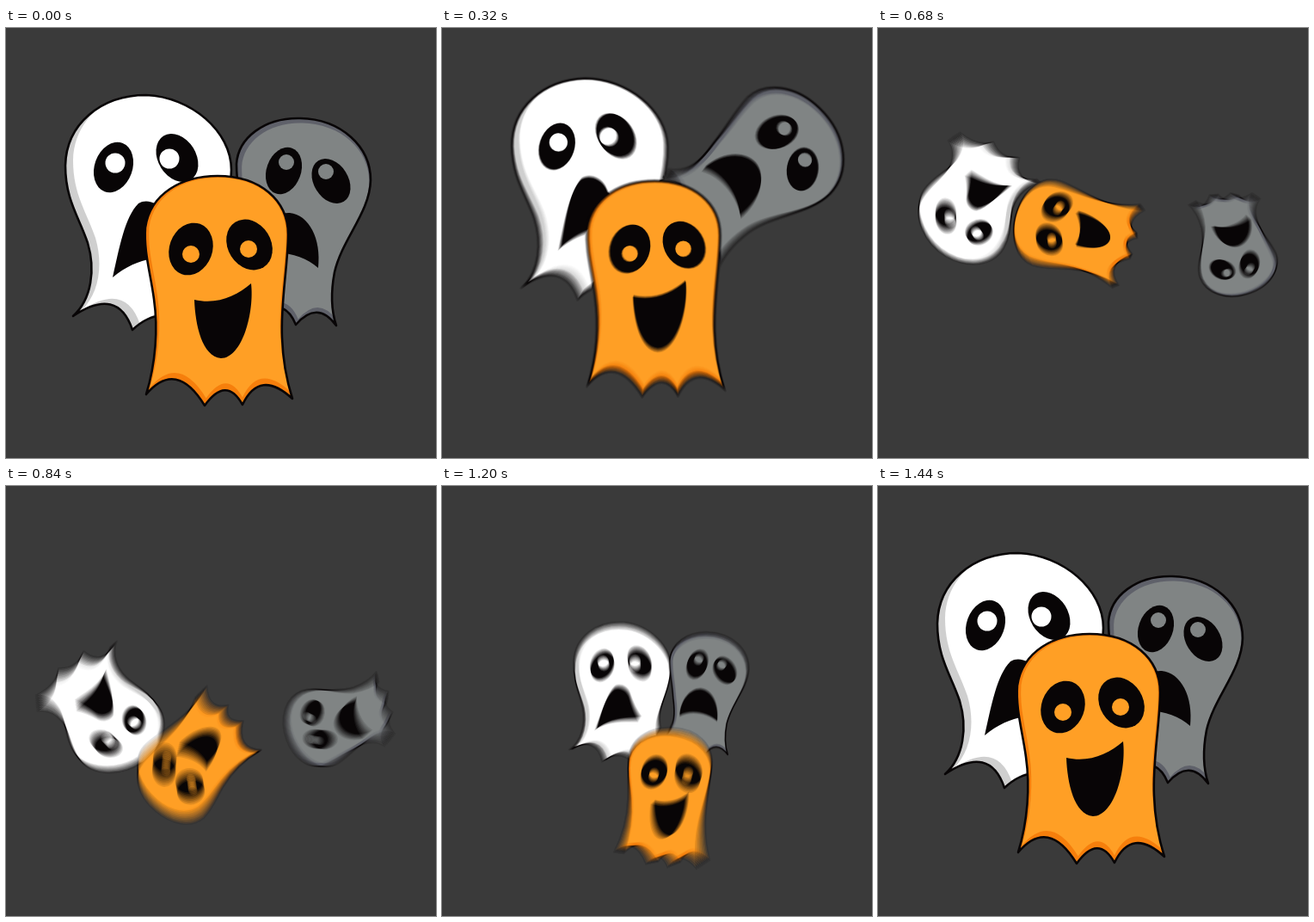
Write an HTML page with a canvas that moves like this. It is 500 px wide and 500 px high and loops after 2000 ms.

```html
<!DOCTYPE html>
<html lang="en">
<head>
<meta charset="utf-8">
<title>Ghosts</title>
<style>
html, body { margin: 0; height: 100%; overflow: hidden; background: #3a3a3a; }
canvas { display: block; }
</style>
</head>
<body>
<canvas id="stage" width="500" height="500"></canvas>
<script>
const LOOP = 2000, STEP = 40, END = 1440;
const SHUTTER = 22, SAMPLES = 10;
const INK = '#080506';
const EYE_TILT = [20, -32];
const KEY_TIMES = [0, 320, 480, 680, 1000, 1200, END];

// path: x, y and degrees of the point between the eyes at the inner key times.
// pupils are round; eyes are tilted ovals of one size per ghost.
const ghosts = [
  {
    fill: '#ffffff', shade: '#cfcfcf', rim: [1, 9, -6], spin: -360,
    body: 'M78 335C100 315 104 280 95 250C85 220 69 200 69 160C70 112 110 78 163 78C215 80 262 120 262 165C262 205 245 230 246 262C247 290 258 305 274 314Q228 312 208 344Q178 322 147 351Q130 300 78 335Z',
    mouth: 'M124 290C132 255 138 220 154 204C163 198 178 203 184 215C192 235 200 250 210 262C185 267 155 264 124 290Z',
    eyes: [[125, 162], [199, 151]], eyeSize: [22, 30],
    pupils: [[127, 157], [190, 152]], pupilSize: 11.5,
    rest: [160, 156],
    path: [[166, 131, -2], [133, 122, -51], [99, 229, -147], [178, 310, -275], [207, 207, -355]]
  },
  {
    fill: '#808484', shade: '#5f616a', rim: [.95, 2, 0], spin: 360,
    body: 'M258 306C280 290 279 262 275 232C273 200 268 185 268 158C270 128 300 104 342 105C390 106 424 138 424 177C423 215 391 245 382 284C378 305 378 328 384 346Q362 316 337 345Q325 315 297 328Q288 300 258 306Z',
    mouth: 'M288 268C290 235 310 214 330 215C352 217 367 245 363 279C345 263 312 255 288 268Z',
    eyes: [[323, 166], [378, 178]], eyeSize: [20, 28],
    pupils: [[326, 156], [372, 167]], pupilSize: 9,
    rest: [351, 172],
    path: [[405, 143, 44], [382, 192, 92], [416, 278, 158], [302, 259, 324], [313, 211, 360]]
  },
  {
    fill: '#ff9f25', shade: '#f67f0c', rim: [.96, 1, -3], spin: -360,
    body: 'M163 426C174 390 177 350 172 315C168 285 160 260 162 232C168 192 205 172 246 172C295 172 328 200 328 240C328 275 319 320 321 360C322 390 327 412 333 431Q295 396 275 438Q256 404 231 439Q198 385 163 426Z',
    mouth: 'M219 316C245 322 268 312 285 297C289 330 275 384 250 384C228 382 220 345 219 316Z',
    eyes: [[215, 257], [283, 252]], eyeSize: [25, 31],
    pupils: [[215, 263], [282, 257]], pupilSize: 10,
    rest: [248, 254],
    path: [[249, 254, 0], [255, 239, 0], [203, 227, -73], [212, 434, -210], [266, 333, -354]]
  }
];

for (const g of ghosts) {
  g.body = new Path2D(g.body);
  g.mouth = new Path2D(g.mouth);
  g.keys = [[...g.rest, 0], ...g.path, [...g.rest, g.spin]];
}

const out = document.getElementById('stage').getContext('2d');
const layer = document.createElement('canvas');
layer.width = layer.height = 500;
const ctx = layer.getContext('2d');

const radians = degrees => degrees * Math.PI / 180;

function smooth(time, from, to) {
  const u = Math.max(0, Math.min(1, (time - from) / (to - from)));
  return u * u * (3 - 2 * u);
}

// Spline through the keys, at rest on both ends.
function poseAt(keys, time) {
  const last = keys.length - 1;
  let i = 0;
  while (i < last - 1 && time > KEY_TIMES[i + 1]) i++;
  const span = KEY_TIMES[i + 1] - KEY_TIMES[i];
  const u = (time - KEY_TIMES[i]) / span, v = 1 - u;
  const speed = (k, c) => k === 0 || k === last ? 0
    : (keys[k + 1][c] - keys[k - 1][c]) / (KEY_TIMES[k + 1] - KEY_TIMES[k - 1]);
  return keys[i].map((value, c) => value * v * v * (1 + 2 * u) + keys[i + 1][c] * u * u * (3 - 2 * u)
    + span * u * v * (speed(i, c) * v - speed(i + 1, c) * u));
}

function oval([x, y], [rx, ry], tilt, color) {
  ctx.fillStyle = color;
  ctx.beginPath();
  ctx.ellipse(x, y, rx, ry, radians(tilt), 0, 2 * Math.PI);
  ctx.fill();
}

function drawGhost(g, time) {
  const [x, y, turn] = poseAt(g.keys, time);
  const [ox, oy] = g.rest;
  const size = 1 - .425 * (smooth(time, 260, 490) - smooth(time, 1180, END));
  const squash = 1 - .12 * Math.abs(Math.sin(radians(turn / 2)));
  ctx.save();
  ctx.translate(x, y);
  ctx.rotate(radians(turn));
  ctx.scale(size, size * squash);
  ctx.translate(-ox, -oy);

  ctx.fillStyle = g.shade;
  ctx.fill(g.body);
  ctx.save();
  ctx.clip(g.body);
  const [scale, dx, dy] = g.rim, cy = oy + 45;
  ctx.translate(ox + dx, cy + dy);
  ctx.scale(scale, scale);
  ctx.translate(-ox, -cy);
  ctx.fillStyle = g.fill;
  ctx.fill(g.body);
  ctx.restore();

  ctx.strokeStyle = INK;
  ctx.lineWidth = 2.6;
  ctx.lineJoin = 'round';
  ctx.stroke(g.body);
  ctx.fillStyle = INK;
  ctx.fill(g.mouth);
  g.eyes.forEach((eye, i) => {
    oval(eye, g.eyeSize, EYE_TILT[i], INK);
    oval(g.pupils[i], [g.pupilSize, g.pupilSize], 0, g.fill);
  });
  ctx.restore();
}

function drawScene(time) {
  ctx.fillStyle = '#3a3a3a';
  ctx.fillRect(0, 0, 500, 500);
  for (const g of ghosts) drawGhost(g, time);
}

// Averages several moments around the time for motion blur.
function render(time) {
  const count = time > 0 && time < END ? SAMPLES : 1;
  for (let k = 0; k < count; k++) {
    const moment = time + ((k + .5) / count - .5) * SHUTTER;
    drawScene(Math.max(0, Math.min(END, moment)));
    out.globalAlpha = 1 / (k + 1);
    out.drawImage(layer, 0, 0);
  }
}

const start = performance.now();
let shown = -1;
function tick() {
  const elapsed = (performance.now() - start) % LOOP;
  const time = Math.min(END, Math.floor(elapsed / STEP) * STEP);
  if (time !== shown) render(shown = time);
  requestAnimationFrame(tick);
}
tick();
</script>
</body>
</html>
```
